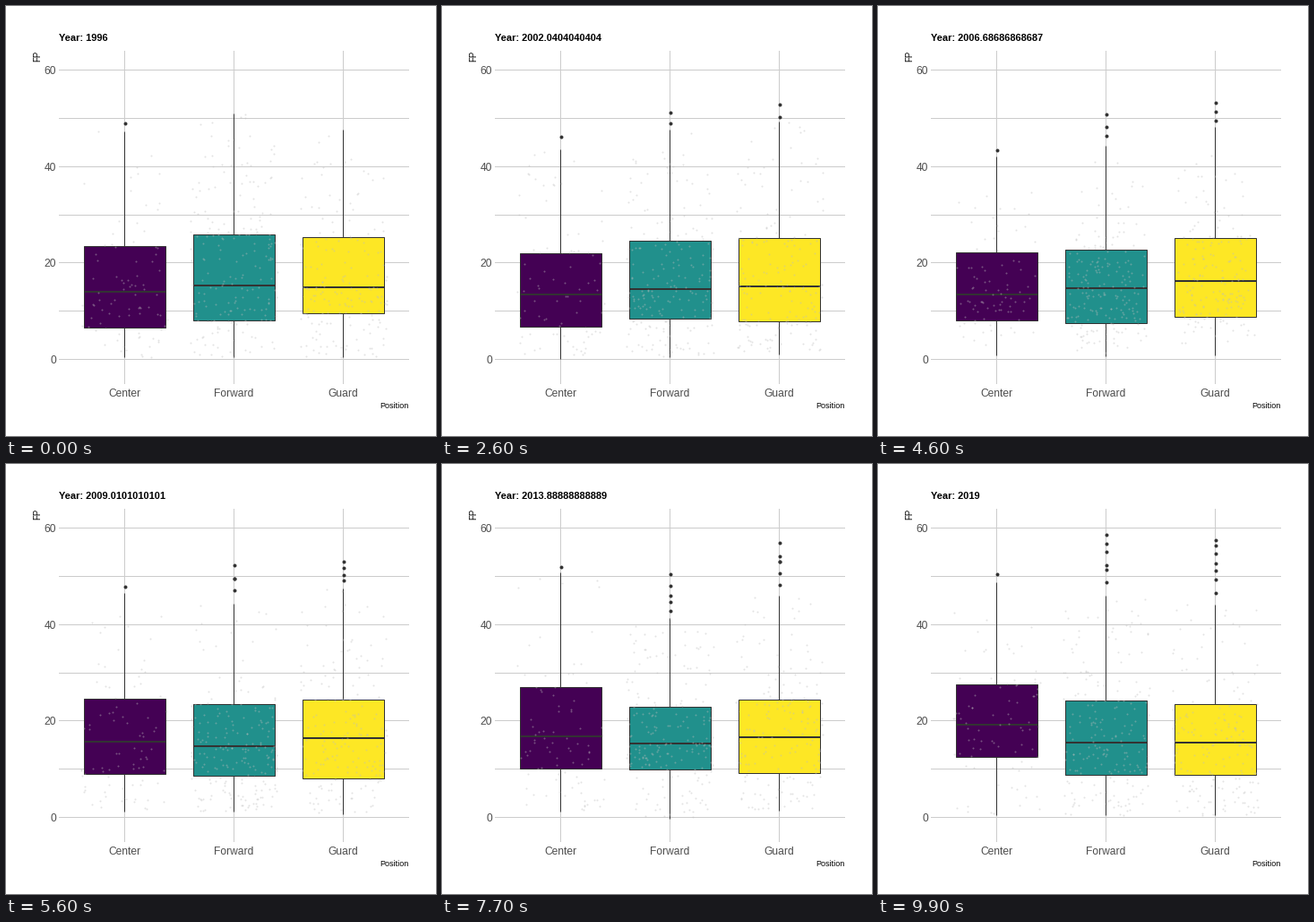
A matplotlib script that plays this animation: 480 by 480 pixels, repeating every 10000 ms.

```python
import numpy as np
import matplotlib.pyplot as plt
from matplotlib.animation import FuncAnimation
from matplotlib.patches import Rectangle

plt.rcParams.update({"font.family": "Liberation Sans", "path.snap": False})

SIZE, DPI, FRAMES = 480, 80, 100
PT = 72 / DPI                      # points per pixel
FIRST, LAST = 1996, 2019
INK, GRID, TICK = "#333333", "#cccccc", "#4d4d4d"
STEPS = np.round(np.linspace(0, FRAMES - 1, LAST - FIRST + 1))  # one per year
KEYS = [0, 37, 69, 99]
REACH, FLOOR = 1.41, 392           # whisker length in IQRs, lowest value


def locate(i):
    """Year index and the fraction of the way to the next year."""
    k = min(np.searchsorted(STEPS, i, side="right") - 1, len(STEPS) - 2)
    return k, (i - STEPS[k]) / (STEPS[k + 1] - STEPS[k])


def resample(values, n):
    return values[np.linspace(0, len(values) - 1, n).round().astype(int)]


class Group:
    """One box with its whiskers, outliers and jittered observations."""

    def __init__(self, ax, name, x, fill, quartiles, extremes, count, seed):
        rng = np.random.default_rng(seed)
        self.x, self.quartiles = x, quartiles
        self.nodes = np.union1d(STEPS, KEYS)
        self.noise = rng.normal(0, 3, (4, len(self.nodes))).clip(-5, 5)
        self.noise[:, np.isin(self.nodes, KEYS)] = 0
        self.clouds = [self.sample(rng, s, count) for s in STEPS]
        sizes = np.linspace(*extremes, len(STEPS)).round().astype(int)
        self.gaps = [np.cumsum(rng.uniform(5, 16, n)) for n in sizes]

        ax.text(x - 0.5, 436, name, size=12 * PT, color=TICK, ha="center")
        line = dict(color=INK, solid_capstyle="butt", zorder=3)
        self.dots, = ax.plot([], [], "o", color=INK, ms=4 * PT, mew=0, zorder=3)
        self.upper, = ax.plot([], [], lw=PT, **line)
        self.lower, = ax.plot([], [], lw=PT, **line)
        self.box = ax.add_patch(Rectangle((x - 45, 0), 91, 0, fc=fill, ec=INK,
                                          lw=PT, zorder=3))
        self.mid, = ax.plot([], [], lw=2 * PT, **line)
        self.cloud, = ax.plot([], [], "o", color="#bebebe", alpha=0.42,
                              ms=2 * PT, mew=0, zorder=4)

    def summary(self, i):
        """Pixel heights of whisker top, Q3, median, Q1 and whisker bottom."""
        base = [np.interp(i, KEYS, q) for q in self.quartiles] + [FLOOR]
        q3, med, q1, low = base + np.array(
            [np.interp(i, self.nodes, n) for n in self.noise])
        return np.array([q3 - REACH * (q1 - q3), q3, med, q1, low])

    def sample(self, rng, i, count):
        """Draw observations that follow the quartiles, with a thin upper tail."""
        top, q3, med, q1, low = self.summary(i)
        u = rng.uniform(0, 1, count)
        tail = np.clip((u - 0.75) * 4, 0, 1) ** 1.6
        y = np.interp(u, [0, 0.25, 0.5, 0.75], [low, q1, med, q3]) + tail * (top - q3)
        return np.column_stack([self.x + rng.uniform(-48.5, 48.5, count), y])

    def draw(self, i):
        top, q3, med, q1, low = np.round(self.summary(i)) + 0.5
        x = self.x
        self.upper.set_data([x, x], [top, q3])
        self.lower.set_data([x, x], [q1, low])
        self.box.set_y(q3)
        self.box.set_height(q1 - q3)
        self.mid.set_data([x - 45, x + 46], [med - 0.5, med - 0.5])

        k, f = locate(i)
        a, b = self.gaps[k], self.gaps[k + 1]
        if len(a) and len(b):
            n = max(len(a), len(b))
            gaps = resample(a, n) * (1 - f) + resample(b, n) * f
        else:
            gaps = a if f < 0.5 else b
        self.dots.set_data(np.full(len(gaps), x), top - gaps)
        self.cloud.set_data(*(self.clouds[k] * (1 - f) + self.clouds[k + 1] * f).T)


fig = plt.figure(figsize=(SIZE / DPI, SIZE / DPI), dpi=DPI, facecolor="white")
ax = fig.add_axes([0, 0, 1, 1])
ax.set(xlim=(0, SIZE), ylim=(SIZE, 0))
ax.axis("off")

rule = dict(color=GRID, lw=PT, solid_capstyle="butt", zorder=1)
for value in range(0, 61, 10):
    y = np.floor(394.6 - 5.385 * value) + 0.5
    ax.plot([59, 450], [y, y], **rule)
    if value % 20 == 0:
        ax.text(56, y + 4.5, str(value), size=12 * PT, color=TICK, ha="right")

ax.text(450, 449, "Position", size=9 * PT, ha="right")
ax.text(38, 61.5, "FP", size=9.6 * PT, rotation=90, ha="left", va="baseline",
        rotation_mode="anchor")
title = ax.text(59, 39, "", size=11 * PT, weight="bold")

# Q3, median and Q1 at the key times; outlier count at start and end
specs = [
    ("Center", "#440154",
     [(268, 286, 251, 246), (319, 325, 309, 291), (359, 356, 347, 327)], (1, 1), 85),
    ("Forward", "#21908c",
     [(255, 267, 277, 264), (312, 317, 315, 311), (351, 354, 344, 347)], (0, 6), 200),
    ("Guard", "#fde725",
     [(258, 262, 263, 268), (314, 313, 307, 311), (343, 349, 346, 347)], (0, 7), 175),
]
groups = []
for n, (name, fill, quartiles, extremes, count) in enumerate(specs):
    x = 132.5 + 122 * n
    ax.plot([x, x], [50, 422], **rule)
    groups.append(Group(ax, name, x, fill, quartiles, extremes, count, seed=n + 3))


def update(i):
    year = FIRST + (LAST - FIRST) * i / (FRAMES - 1)
    title.set_text(f"Year: {year:.15g}")
    for g in groups:
        g.draw(i)
    return []


anim = FuncAnimation(fig, update, frames=FRAMES, interval=100, repeat=True,
                     repeat_delay=0, blit=False)
plt.show()
```
